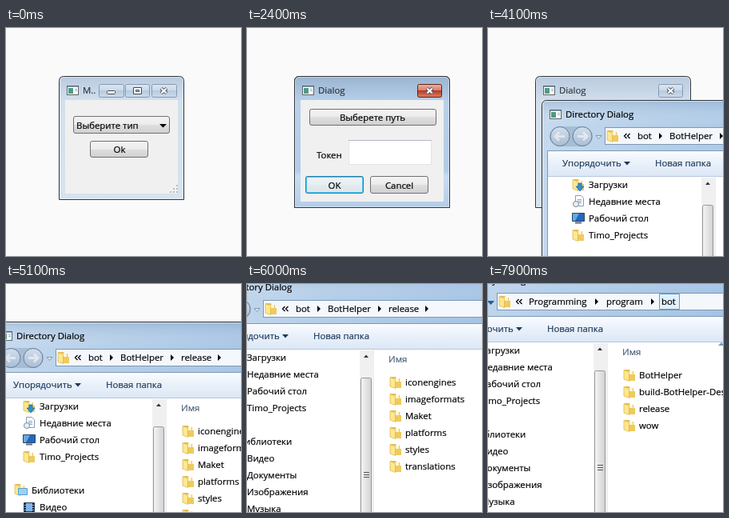
These frames come from a looping animation (294 px wide and 285 px high, 8000 ms). An HTML page:

```html
<!DOCTYPE html>
<html lang="ru">
<head>
<meta charset="utf-8">
<title>Dialogs</title>
<style>
html, body { margin: 0; width: 100%; height: 100%; overflow: hidden; background: #fafafa; }
svg { display: block; width: 294px; height: 285px; }
text {
  font: 11.4px "Open Sans", "Noto Sans", sans-serif;
  color: #000; fill: currentColor; stroke: currentColor; stroke-width: .2;
}
.mid { text-anchor: middle; }
.bar text { color: #1e395b; }
.head { color: #4c607a; }
.dim { opacity: .75; }
.btn { fill: url(#btn); stroke: #707070; }
.hot { fill: url(#hot); stroke: #3c7fb1; }
.down { fill: url(#down); stroke: #2c628b; }
.cap { fill: url(#cap); stroke: #8699b0; }
.red { fill: url(#red); stroke: #5e2218; }
.seg { fill: #e2f1fc; stroke: #5a9fce; }

/* Every timeline lasts 8 s, so 1.25% is one 100 ms tick */
.t { animation: 8s step-end infinite; }
.x { opacity: 0; }
#main { animation-name: main; }
#mainOn, #mainCap { animation-name: mainOn; }
#comboHot { animation-name: comboHot; }
#list { animation-name: list; }
#row { animation-name: row; }
#before { animation-name: before; }
#after { animation-name: after; }
#okHot { animation-name: okHot; }
#okDown { animation-name: okDown; }
#dlg { animation-name: dlg; }
#dlgOn { animation-name: dlgOn; }
#glow { animation-name: glow; }
#pathHot { animation-name: pathHot; }
#pathDown { animation-name: pathDown; }
#files { animation-name: files, drag; }
#side { animation-name: side; }
#segHelper { animation-name: segHelper; }
#segBot { animation-name: segBot; }
#segDown { animation-name: segDown; }
#segArrow { animation-name: segArrow; }
#crumbs1, #list1 { animation-name: leave; }
#crumbs2 { animation-name: crumbs2; }
#list2 { animation-name: list2; }

@keyframes main { 26.25% { opacity: .4 } 27.5% { opacity: 0 } }
@keyframes mainOn { 11.25% { opacity: 1 } }
@keyframes comboHot {
  5% { opacity: .25 } 6.25% { opacity: .5 } 7.5% { opacity: .75 } 8.75% { opacity: 1 }
  16.25% { opacity: .5 } 17.5% { opacity: 0 }
}
@keyframes list { 12.5% { opacity: .6 } 13.75% { opacity: 1 } 16.25% { opacity: 0 } }
@keyframes row { 15% { transform: translateY(18px) } }
@keyframes before { 16.25% { opacity: 0 } }
@keyframes after { 16.25% { opacity: 1 } }
@keyframes okHot { 22.5% { opacity: .4 } 23.75% { opacity: .9 } }
@keyframes okDown { 25% { opacity: 1 } }
@keyframes dlg { 27.5% { opacity: .5 } 28.75% { opacity: .85 } 30% { opacity: 1 } }
@keyframes dlgOn { 42.5% { opacity: 0 } }
@keyframes glow {
  32.5% { opacity: .85 } 33.75% { opacity: .7 } 35% { opacity: .5 }
  36.25% { opacity: .35 } 37.5% { opacity: .2 } 38.75% { opacity: 0 }
}
@keyframes pathHot {
  32.5% { opacity: .25 } 33.75% { opacity: .5 } 35% { opacity: .75 } 36.25% { opacity: 1 }
  45% { opacity: 0 }
}
@keyframes pathDown { 38.75% { opacity: 1 } 40% { opacity: 0 } }
@keyframes files { 47.5% { opacity: .6 } 48.75% { opacity: 1 } }
@keyframes drag {
  61.25% { transform: translate(-20px, -8px) }
  62.5% { transform: translate(-54px, -26px) }
  63.75% { transform: translate(-84px, -43px) }
  65% { transform: translate(-98px, -57px) }
  66.25% { transform: translate(-105px, -67px) }
  70% { transform: translate(-107px, -72px) }
  71.25% { transform: translate(-111px, -81px) }
  72.5% { transform: translate(-117px, -91px) }
  73.75% { transform: translate(-122px, -98px) }
  75% { transform: translate(-126px, -104px) }
  76.25% { transform: translate(-131px, -109px) }
  77.5% { transform: translate(-135px, -113px) }
}
@keyframes side { 51.25% { opacity: 1 } }
@keyframes segHelper { 86.25% { opacity: .6 } 87.5% { opacity: 1 } 88.75% { opacity: .4 } 90% { opacity: 0 } }
@keyframes segBot { 88.75% { opacity: .6 } 90% { opacity: 1 } }
@keyframes segDown { 92.5% { opacity: 1 } 95% { opacity: 0 } }
@keyframes segArrow { 88.75% { opacity: .6 } 90% { opacity: 1 } 95% { opacity: 0 } }
@keyframes leave { 97.5% { opacity: 0 } }
@keyframes crumbs2 { 97.5% { opacity: 1 } }
@keyframes list2 { 98.75% { opacity: 1 } }
</style>
</head>
<body>
<svg viewBox="0 0 294 285">
  <defs>
    <linearGradient id="btn" x2="0" y2="1">
      <stop stop-color="#f4f4f4"/><stop offset=".5" stop-color="#ebebeb"/>
      <stop offset=".5" stop-color="#dfdfdf"/><stop offset="1" stop-color="#d0d0d0"/>
    </linearGradient>
    <linearGradient id="hot" x2="0" y2="1">
      <stop stop-color="#eaf6fd"/><stop offset=".5" stop-color="#d5eefb"/>
      <stop offset=".5" stop-color="#bee6fd"/><stop offset="1" stop-color="#a7d9f5"/>
    </linearGradient>
    <linearGradient id="down" x2="0" y2="1">
      <stop stop-color="#d8eefa"/><stop offset=".5" stop-color="#c4e5f6"/>
      <stop offset=".5" stop-color="#98d1ef"/><stop offset="1" stop-color="#7bc0e4"/>
    </linearGradient>
    <linearGradient id="cap" x2="0" y2="1">
      <stop stop-color="#dbe6f2"/><stop offset=".5" stop-color="#c9d8e9"/>
      <stop offset=".5" stop-color="#b7cade"/><stop offset="1" stop-color="#cbdbec"/>
    </linearGradient>
    <linearGradient id="red" x2="0" y2="1">
      <stop stop-color="#eab3a8"/><stop offset=".5" stop-color="#d67a69"/>
      <stop offset=".5" stop-color="#b93a24"/><stop offset="1" stop-color="#d8836a"/>
    </linearGradient>
    <linearGradient id="on" x2="0" y2="1">
      <stop stop-color="#9ab4d1"/><stop offset=".2" stop-color="#b9d0e9"/>
      <stop offset=".72" stop-color="#b4cce6"/><stop offset=".76" stop-color="#c6ddf1"/>
      <stop offset="1" stop-color="#b5cde7"/>
    </linearGradient>
    <linearGradient id="off" x2="0" y2="1">
      <stop stop-color="#b9cbdf"/><stop offset=".2" stop-color="#d2dfed"/>
      <stop offset="1" stop-color="#d6e3f0"/>
    </linearGradient>
    <linearGradient id="glass" gradientUnits="userSpaceOnUse" x1="67" y1="100" x2="430" y2="130">
      <stop stop-color="#c6daee"/><stop offset=".4" stop-color="#b6cfe9"/>
      <stop offset="1" stop-color="#a5c4e5"/>
    </linearGradient>
    <linearGradient id="shade" x2="0" y2="1">
      <stop stop-color="#6f93bb" stop-opacity=".3"/><stop offset="1" stop-color="#fff" stop-opacity="0"/>
    </linearGradient>
    <linearGradient id="tools" x2="0" y2="1">
      <stop stop-color="#fafcff"/><stop offset=".5" stop-color="#e8f0fa"/>
      <stop offset="1" stop-color="#dce7f5"/>
    </linearGradient>
    <linearGradient id="thumb"><stop stop-color="#f5f5f5"/><stop offset="1" stop-color="#d2d2d4"/></linearGradient>
    <linearGradient id="nav" x2="0" y2="1"><stop stop-color="#d3dfec"/><stop offset="1" stop-color="#a9bdd4"/></linearGradient>

    <g id="app">
      <rect x=".5" y=".5" width="14" height="11" fill="#fff" stroke="#566"/>
      <path d="M1 1.5h13" stroke="#9ab"/>
      <path d="M2 3h6v7H2z" fill="#4f9a86"/>
      <path d="M10 4.5h3M10 6.5h3" stroke="#aab"/>
    </g>
    <g id="cross">
      <path d="M-3.5-3l7 6m0-6l-7 6" stroke="#434a56" stroke-width="4.2"/>
      <path d="M-3.2-2.8l6.4 5.6m0-5.6l-6.4 5.6" stroke="#fff" stroke-width="2.2"/>
    </g>
    <g id="sizers">
      <rect class="cap" x="116.5" y="70.5" width="31" height="16" rx="2"/>
      <rect class="cap" x="149.5" y="70.5" width="30" height="16" rx="2"/>
      <g fill="#fff" stroke="#434a56">
        <rect x="126.5" y="78.5" width="10" height="4" rx="1"/>
        <path d="M159.5 74.5h10v8h-10zM162.5 77.5h4v2h-4z" fill-rule="evenodd"/>
      </g>
    </g>
    <path id="mainBox" d="M66.5 214.5V66.5q0-6 6-6h144q6 0 6 6v148z" stroke="#2f343a"/>
    <path id="dlgBox" d="M59.5 224.5V66.5q0-6 6-6h182q6 0 6 6v158z" stroke="#2f343a"/>
    <path id="next" d="M-2-4v8l4-4z"/>
    <g id="dir">
      <path d="M2 0h6l1 2h4v9H2z" fill="#e6bf52"/>
      <path d="M6 2h6v8H6z" fill="#fff6d0"/>
      <path d="M7 6h8v8H7z" fill="#efca5e"/>
      <path d="M1 .5l6.500 2.500v11.500l-6.500-2.500z" fill="#fce88f" stroke="#d8b040" stroke-width=".7"/>
    </g>
    <g id="sheet">
      <path d="M2.5.5h7l3 3v10h-10z" fill="#fff" stroke="#8b9cae"/>
      <path d="M5 5.5h5M5 7.5h5M5 9.5h5" stroke="#7aa5d0"/>
    </g>
  </defs>

  <g id="main" class="t">
    <use href="#mainBox" fill="url(#off)"/>
    <use href="#mainBox" id="mainOn" class="t x" fill="url(#on)"/>
    <path d="M67.5 213.5V67q0-5.5 5.5-5.5h143q5.5 0 5.5 5.5v146.5z" fill="none" stroke="#fff" opacity=".4"/>
    <path d="M74 90h141v117H74z" fill="#f0f0f0"/>
    <use href="#app" x="76" y="72"/>
    <text class="dim" x="96" y="82">M..</text>
    <use href="#sizers"/>
    <rect class="cap" x="182.5" y="70.5" width="31" height="16" rx="2"/>
    <g id="mainCap" class="t x">
      <text x="96" y="82">M..</text>
      <rect class="red" x="182.5" y="70.5" width="31" height="16" rx="2"/>
    </g>
    <use href="#cross" x="197.5" y="78.5"/>
    <rect class="btn" x="84.5" y="110.5" width="120" height="21" rx="2.5"/>
    <rect id="comboHot" class="hot t x" x="84.5" y="110.5" width="120" height="21" rx="2.5"/>
    <text id="before" class="t" x="88" y="126">Выберите тип</text>
    <text id="after" class="t x" x="88" y="126">Courlane (telebot)</text>
    <path d="M192 120h9l-4.5 4.5z"/>
    <rect class="btn" x="105.5" y="141.5" width="72" height="20" rx="2.5"/>
    <rect id="okHot" class="hot t x" x="105.5" y="141.5" width="72" height="20" rx="2.5"/>
    <rect id="okDown" class="down t x" x="105.5" y="141.5" width="72" height="20" rx="2.5"/>
    <text class="mid" x="142" y="156">Ok</text>
    <path d="M205 205h10M209 201h6M213 197h2" stroke="#bdbdbd" stroke-width="2" stroke-dasharray="2 2"/>
    <g id="list" class="t x">
      <rect x="84.5" y="132.5" width="120" height="54" fill="#fff" stroke="#828790"/>
      <rect id="row" class="t" x="85.5" y="133.5" width="118" height="17" rx="2" fill="#dcebfc" stroke="#a9cbee"/>
      <text x="88" y="146">Выберите тип</text>
      <text x="88" y="164">Courlane (telebot)</text>
      <text x="88" y="182">Palvern</text>
    </g>
  </g>

  <g id="dlg" class="t x">
    <use href="#dlgBox" fill="url(#off)"/>
    <rect class="cap" x="213.5" y="70.5" width="30" height="16" rx="2"/>
    <g id="dlgOn" class="t">
      <use href="#dlgBox" fill="url(#on)"/>
      <rect class="red" x="213.5" y="70.5" width="30" height="16" rx="2"/>
    </g>
    <path d="M60.5 223.5V67q0-5.5 5.5-5.5h181q5.5 0 5.5 5.5v156.5z" fill="none" stroke="#fff" opacity=".4"/>
    <use href="#cross" x="228.5" y="78.5"/>
    <use href="#app" x="69" y="72"/>
    <text class="dim" x="89" y="82">Dialog</text>
    <path d="M67 90h179v127H67z" fill="#f0f0f0"/>
    <rect class="btn" x="78.5" y="101.5" width="158" height="20" rx="2.5"/>
    <rect id="pathHot" class="hot t x" x="78.5" y="101.5" width="158" height="20" rx="2.5"/>
    <rect id="pathDown" class="down t x" x="78.5" y="101.5" width="158" height="20" rx="2.5"/>
    <text class="mid" x="157" y="116">Выберете путь</text>
    <text x="87" y="163">Токен</text>
    <rect x="127.5" y="140.5" width="103" height="30" fill="#fff" stroke="#e1e4ea"/>
    <path d="M127 140.5h104" stroke="#b5b8c0"/>
    <rect class="btn" x="73.5" y="185.5" width="72" height="21" rx="2.5"/>
    <g id="glow" class="t">
      <rect x="73.5" y="185.5" width="72" height="21" rx="2.5" fill="#e6f2f9" fill-opacity=".6" stroke="#2f7ea8"/>
      <rect x="74.5" y="186.5" width="70" height="19" rx="1.5" fill="none" stroke="#48c8f2"/>
    </g>
    <text class="mid" x="109.5" y="201">OK</text>
    <rect class="btn" x="154.5" y="185.5" width="72" height="21" rx="2.5"/>
    <text class="mid" x="190.5" y="201">Cancel</text>
  </g>

  <g id="files" class="t x">
    <path d="M67.5 600V96.5q0-6 6-6H600V600z" fill="url(#glass)" stroke="#2a3038"/>
    <path d="M68.5 122V97q0-5.5 5.5-5.5H600V122z" fill="url(#shade)"/>
    <path d="M68.5 600V97q0-5.5 5.5-5.5H600" fill="none" stroke="#fff" opacity=".5"/>
    <use href="#app" x="77" y="102"/>
    <text x="97" y="112">Directory Dialog</text>

    <rect x="77" y="123" width="54" height="25" rx="12.5" fill="#8ba4c0" opacity=".5"/>
    <g fill="url(#nav)" stroke="#667d98">
      <circle cx="90" cy="135.5" r="12"/>
      <circle cx="118" cy="135.5" r="12"/>
    </g>
    <path d="M96 135.5H84m5-5l-5 5 5 5M112 135.5h12m-5-5l5 5-5 5" fill="none" stroke="#eef3f9" stroke-width="3" opacity=".7"/>
    <path d="M135 134.5h7l-3.5 4z" fill="#dbe7f4" stroke="#6d88a8" stroke-width=".8"/>

    <rect x="146.5" y="124.5" width="500" height="21" fill="#f4f8fd" stroke="#7d98b6"/>
    <use href="#dir" x="148" y="128"/>
    <path d="M173.5 132l-3 3 3 3m4-6l-3 3 3 3" fill="none" stroke="#000" stroke-width="1.3"/>
    <g id="crumbs1" class="t">
      <path id="segHelper" class="seg t x" d="M222.5 125.5h75v19h-75zM285.5 125.5v19"/>
      <path id="segArrow" class="seg t x" d="M207.5 125.5h15v19h-15z"/>
      <path id="segBot" class="seg t x" d="M182.5 125.5h25v19h-25z"/>
      <path id="segDown" class="t x" d="M182.5 125.5h25v19h-25z" fill="#c2e0f5" stroke="#4a8fc0"/>
      <text x="187" y="139">bot</text><use href="#next" x="216" y="135"/>
      <text x="227" y="139">BotHelper</text><use href="#next" x="292" y="135"/>
      <text x="303" y="139">release</text><use href="#next" x="351" y="135"/>
    </g>
    <g id="crumbs2" class="t x">
      <path d="M134 134h9l-4.5 5z" fill="#235f9c"/>
      <path class="seg" d="M349.5 125.5h25v19h-25z"/>
      <text x="186" y="139">Programming</text><use href="#next" x="271" y="135"/>
      <text x="283" y="139">program</text><use href="#next" x="341" y="135"/>
      <text x="352" y="139">bot</text>
    </g>

    <path d="M75 154h525v446H75z" fill="#fff"/>
    <g class="bar">
      <path d="M75 154h525v32H75z" fill="url(#tools)"/>
      <path d="M75 185.5h525" stroke="#b6c8dd"/>
      <path d="M74.5 600V153.5H600" fill="none" stroke="#7f98b5"/>
      <text x="93" y="173">Упорядочить</text>
      <path d="M170 167h8l-4 4.5z" fill="#1e395b"/>
      <text x="209" y="173">Новая папка</text>
    </g>

    <g id="side" class="t x">
      <use href="#dir" x="105" y="189"/>
      <path d="M113 194h4v4h3l-5 6-5-6h3z" fill="#2f8fd8" stroke="#1b5f9c" stroke-width=".7"/>
      <text x="126" y="200">Загрузки</text>
      <use href="#sheet" x="107" y="209"/>
      <circle cx="110" cy="220" r="3.5" fill="#e9eef4" stroke="#7d8a99"/>
      <text x="126" y="221">Недавние места</text>
      <path d="M105.5 231.5h15v10h-15z" fill="#2468bd" stroke="#31445c"/>
      <path d="M106 232h8l-5 9h-3z" fill="#64a9e6"/>
      <path d="M109 243.5h8" stroke="#667" stroke-width="2"/>
      <text x="126" y="242">Рабочий стол</text>
      <use href="#dir" x="105" y="252"/>
      <text x="126" y="263">Timo_Projects</text>
      <use href="#dir" x="94" y="293"/>
      <path d="M99.5 298.5h11v8h-11z" fill="#9fd0f0" stroke="#5b9fce"/>
      <text x="116" y="305">Библиотеки</text>
      <path d="M106.5 316.5h13v11h-13z" fill="#7db7e8" stroke="#2d4058"/>
      <path d="M108 317v11M118 317v11" stroke="#223" stroke-width="2" stroke-dasharray="2 1"/>
      <text x="126" y="326">Видео</text>
      <use href="#sheet" x="106" y="336"/>
      <text x="126" y="347">Документы</text>
      <path d="M106.5 358.5h13v10h-13z" fill="#a8d4f3" stroke="#8b9cae"/>
      <path d="M107 368l4-5 3 3 2-2 3 4z" fill="#4d9a58"/>
      <text x="126" y="368">Изображения</text>
      <path d="M112 390v-10l6-2v10" fill="none" stroke="#2f7fd0" stroke-width="2"/>
      <circle cx="110.5" cy="390" r="2.5" fill="#2f7fd0"/><circle cx="116.5" cy="388" r="2.5" fill="#2f7fd0"/>
      <text x="126" y="389">Музыка</text>
      <path d="M267 187h17v413h-17z" fill="#f0f0f1"/>
      <path d="M272 196h6l-3-3.5z" fill="#333"/>
      <rect x="268.5" y="221.5" width="13" height="243" rx="2" fill="url(#thumb)" stroke="#979797"/>
      <path d="M272 339.5h7M272 342.5h7M272 345.5h7" stroke="#555"/>
    </g>
    <path d="M284.5 186v414" stroke="#e9eff6"/>

    <text class="head" x="303" y="202">Имя</text>
    <path d="M423 190h8l-4-4z" fill="#6f9cc4"/>
    <g id="list1" class="t">
      <use href="#dir" x="304" y="220"/><text x="324" y="231">iconengines</text>
      <use href="#dir" x="304" y="241"/><text x="324" y="252">imageformats</text>
      <use href="#dir" x="304" y="262"/><text x="324" y="273">Maket</text>
      <use href="#dir" x="304" y="283"/><text x="324" y="294">platforms</text>
      <use href="#dir" x="304" y="304"/><text x="324" y="315">styles</text>
      <use href="#dir" x="304" y="325"/><text x="324" y="336">translations</text>
    </g>
    <g id="list2" class="t x">
      <use href="#dir" x="304" y="220"/><text x="324" y="231">BotHelper</text>
      <use href="#dir" x="304" y="241"/><text x="324" y="252">build-BotHelper-Desktop</text>
      <use href="#dir" x="304" y="262"/><text x="324" y="273">release</text>
      <use href="#dir" x="304" y="283"/><text x="324" y="294">wow</text>
    </g>
  </g>
</svg>
</body>
</html>
```
